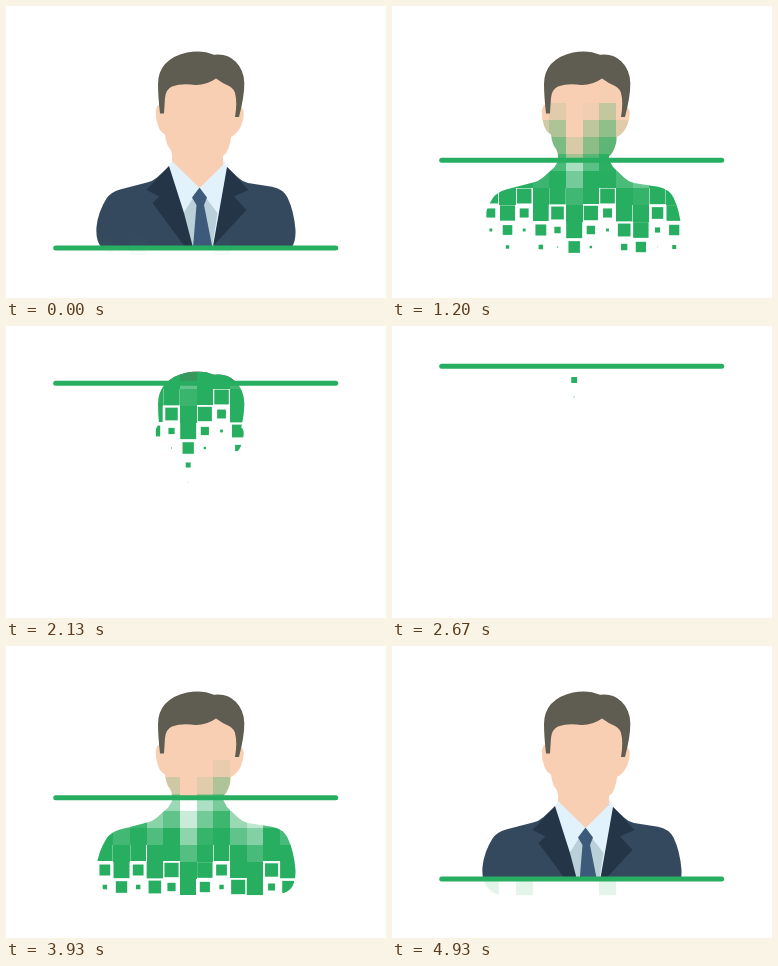
Recreate the animation shown at these times as an HTML page. Size 380 px wide and 292 px high, loop 4.96 s.

```html
<!DOCTYPE html>
<html lang="en">
<head>
<meta charset="utf-8">
<title>Scan</title>
<style>
  html, body { margin: 0; width: 100%; height: 100%; overflow: hidden; background: #fff; }
  svg { display: block; }
</style>
</head>
<body>
<svg width="380" height="292" viewBox="0 0 380 292">
  <defs>
    <path id="suit" d="M163 160.500 L151 171.500 Q147 175 141 176.500 L114 183.500 Q105 186 100.500 192.500 Q92 206 90.500 221 Q89.500 234 95 241 Q101 249 111 249.200 L262 249.200 Q279 249 284.500 243 Q290 237 289.500 224 Q288 205 281.500 191.500 Q277 183 266 180.800 L242 177 Q236 175.500 232 171.500 L221 161 Z"/>
    <path id="shirt" d="M167 153.500 L162.500 161 L187 249 H206 L221.500 162 L217 153.500 Z"/>
    <path id="face" d="M155 98 Q150 99 149.800 105 Q149.500 113 152 119.500 Q154 126 159 128.500 Q160 136 162 140 Q166 145 166 150 V155 L193.500 182 L217 159 V150 Q221 147 222.500 142 Q225 136 225 131 Q232 127 235 120 Q238.500 111 237.500 105 Q237 102 234 101 L231 70 H158 Z"/>
    <path id="hair" d="M154 107.500 Q152 90 152 78 Q152 66 159 58 Q168 49 181 46.500 Q196 43.500 208 48.800 Q221 47 229.500 55.500 Q238 64 238.300 77 Q238.500 90 233 111 H229 Q231.500 96 229 87 Q228 83 223 80 Q216 77 210 72.500 Q200 79.500 189 79 Q176 77 166 80.500 Q160 83 159 92 L158 107.500 Z"/>
    <clipPath id="body">
      <use href="#suit"/><use href="#shirt"/><use href="#face"/><use href="#hair"/>
    </clipPath>
    <clipPath id="above"><rect id="window" width="380" height="242"/></clipPath>
  </defs>
  <g clip-path="url(#above)">
    <use href="#suit" fill="#34495e"/>
    <use href="#shirt" fill="#e2f2fd"/>
    <path fill="#b9d0d8" d="M187 192 L177.500 207 L188 249 H205 L211.500 207 L200 192 Z"/>
    <path fill="#3d5a7a" d="M193.500 181.500 L201 191.500 L198 199 L206.500 242 V249 H187 V242 L190.500 199 L186 191.500 Z"/>
    <path fill="#243548" d="M163 160 L140.500 184 L153.500 190.500 L146.500 197 L185 249 H189 L178 207 Z M221 161 L242.500 184 L228 190.500 L240.500 204 L207 240 L205.500 249 Z"/>
    <use href="#face" fill="#f9cfb4"/>
    <use href="#hair" fill="#5f5d51"/>
  </g>
  <g id="tiles" clip-path="url(#body)" fill="#27ae60"></g>
  <line id="beam" x1="49.700" x2="329.700" stroke="#27ae60" stroke-width="5" stroke-linecap="round"/>
</svg>
<script>
const LOOP = 4960, ROWS = 12, CELL_W = 16.67, CELL_H = 17, LEFT = 90.5, TOP = 45.5;
// how many rows each column lags behind the wave
const lag = [3.6, 4.7, 3.6, 4.9, 4.2, 6, 4.5, 3.6, 5.2, 5.8, 4, 4.8];

const beamKeys = [[0, 242], [300, 234.5], [730, 204], [1670, 101.5], [2170, 55], [2600, 40],
  [2670, 40.2], [3430, 101.5], [4370, 194], [4930, 233], [4960, 234.5]];
const waveKeys = [[0, -11.3], [730, -6.8], [1670, 0], [2170, 3.9], [2595, 9.3],
  [2670, 8.4], [3230, 1.3], [3430, -0.55], [4370, -8], [4930, -11], [4960, -11.2]];

const clamp = (x, lo, hi) => Math.min(hi, Math.max(lo, x));

// smooth curve through the keys that never overshoots
function curve(keys) {
  const rise = keys.slice(1).map(([t, y], i) => (y - keys[i][1]) / (t - keys[i][0]));
  const slope = keys.map((_, i) => {
    const a = rise[i - 1], b = rise[i];
    if (i === 0) return b / 2;
    if (b === undefined) return a;
    return a * b <= 0 ? 0 : 2 * a * b / (a + b);
  });
  return t => {
    let i = 0;
    while (i < keys.length - 2 && t >= keys[i + 1][0]) i++;
    const [t0, y0] = keys[i], [t1, y1] = keys[i + 1];
    const h = t1 - t0, u = (t - t0) / h, w = 1 - u;
    return w * w * ((1 + 2 * u) * y0 + u * h * slope[i]) +
           u * u * ((3 - 2 * u) * y1 - w * h * slope[i + 1]);
  };
}

const beamAt = curve(beamKeys), waveAt = curve(waveKeys);
const byId = id => document.getElementById(id);
const beam = byId('beam'), view = byId('window');
const set = (el, attrs) => { for (const k in attrs) el.setAttribute(k, attrs[k]); };

const tiles = [];
for (let row = 0; row < ROWS; row++) {
  lag.forEach((delay, col) => {
    const el = document.createElementNS(beam.namespaceURI, 'rect');
    byId('tiles').append(el);
    tiles.push({ el, offset: row - delay, x: LEFT + (col + 0.5) * CELL_W, y: TOP + (row + 0.5) * CELL_H });
  });
}

function draw(t) {
  const y = beamAt(t), wave = waveAt(t);
  const fade = clamp(5.4 + wave * 0.36, 3, 5.4);
  set(beam, { y1: y, y2: y });
  set(view, { height: y });
  for (const { el, offset, x, y: cy } of tiles) {
    const age = offset + wave;
    const size = (1 + Math.cos(Math.PI * clamp(age / 4, 0, 1))) / 2;
    const w = CELL_W * size, h = CELL_H * size;
    set(el, {
      x: x - w / 2, y: cy - h / 2, width: w, height: h,
      opacity: clamp(1 + (age + 1) / fade, 0, 1),
      'shape-rendering': size > 0.99 ? 'crispEdges' : 'auto'
    });
  }
}

const start = performance.now();
function tick() {
  draw((performance.now() - start) % LOOP);
  requestAnimationFrame(tick);
}
tick();
</script>
</body>
</html>
```
